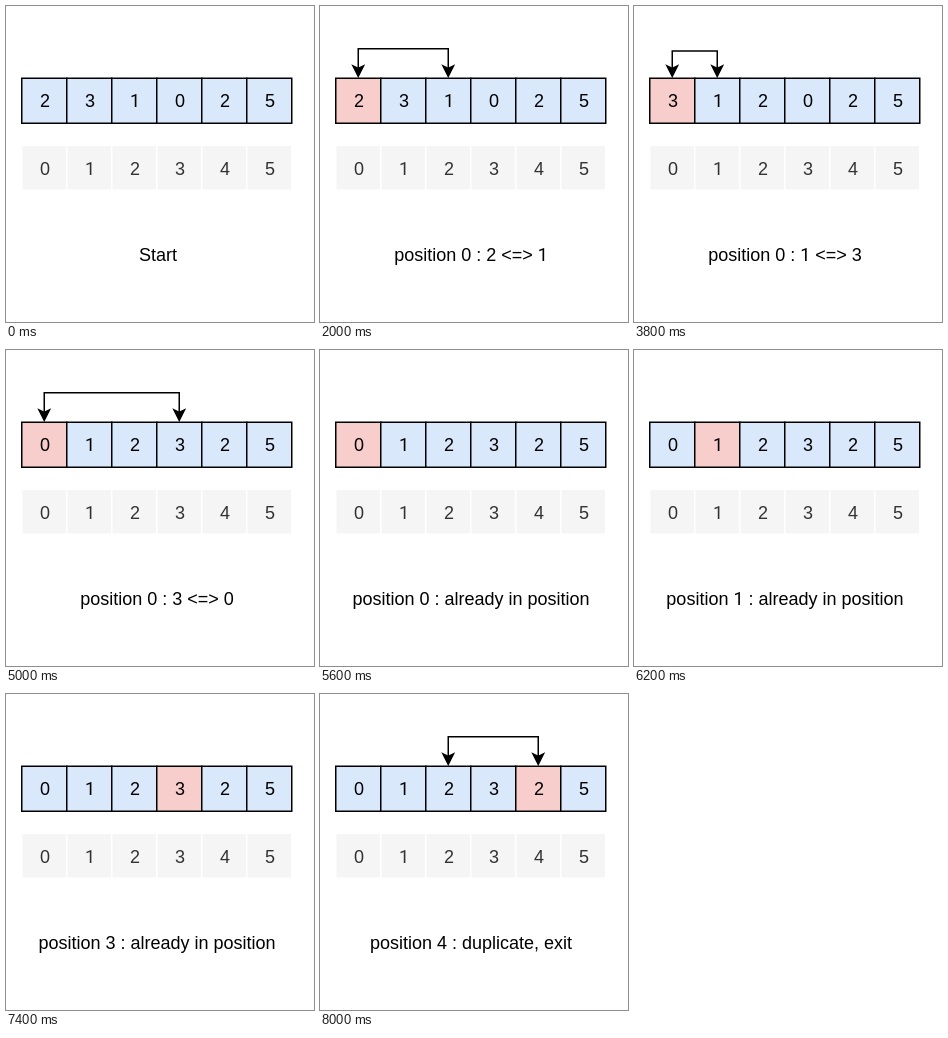
These frames come from a looping animation (308 px wide and 316 px high, 10 s). An HTML page:

```html
<!DOCTYPE html>
<html lang="en">
<head>
<meta charset="utf-8">
<title>In-place duplicate search</title>
<style>
  html, body { margin: 0; width: 100%; height: 100%; overflow: hidden; background: #fff; }
  svg { display: block; width: 308px; height: 316px; }
  text { font: 18px "Liberation Sans", Arial, sans-serif; text-anchor: middle; white-space: pre; }
  .one { font-family: Roboto, sans-serif; }
</style>
</head>
<body>
<svg id="stage" viewBox="0 0 308 316"></svg>
<script>
const NS = "http://www.w3.org/2000/svg";
const stage = document.getElementById("stage");
const LOOP = 10000, LEFT = 15.75, TOP = 72.25, SIZE = 45;
const BLUE = "#dae8fc", RED = "#f8cecc";

// at: start time, cells: values, hot: active cell, to: arrow end
const steps = [
  { at: 0,    cells: "231025", label: "Start" },
  { at: 2000, cells: "231025", hot: 0, to: 2, label: "position 0 : 2 <=> 1" },
  { at: 2600, cells: "132025", hot: 0, to: 2, label: "position 0 : 2 <=> 1" },
  { at: 3200, cells: "132025", hot: 0, to: 1, label: "position 0 : 1 <=> 3" },
  { at: 3800, cells: "312025", hot: 0, to: 1, label: "position 0 : 1 <=> 3" },
  { at: 4400, cells: "312025", hot: 0, to: 3, label: "position 0 : 3 <=> 0" },
  { at: 5000, cells: "012325", hot: 0, to: 3, label: "position 0 : 3 <=> 0" },
  ...[0, 1, 2, 3].map(i => ({
    at: 5600 + i * 600, cells: "012325", hot: i,
    label: `position ${i} : already in position`
  })),
  { at: 8000, cells: "012325", hot: 4, to: 2, label: "position 4 : duplicate, exit" }
];

function add(name, attrs, parent = stage) {
  const el = document.createElementNS(NS, name);
  for (const key in attrs) el.setAttribute(key, attrs[key]);
  parent.appendChild(el);
  return el;
}

// The digit 1 is set in a face that has no foot serif.
function write(el, str) {
  el.textContent = "";
  for (const part of str.split(/(1)/)) {
    if (!part) continue;
    add("tspan", part === "1" ? { class: "one" } : {}, el).textContent = part;
  }
}

function row(y, fill, stroke, ink, baseline) {
  return Array.from({ length: 6 }, (_, i) => ({
    box: add("rect", { x: LEFT + i * SIZE, y, width: SIZE, height: SIZE, fill, stroke, "stroke-width": 1.5 }),
    text: add("text", { x: 39 + i * SIZE, y: baseline, fill: ink })
  }));
}

const cells = row(TOP, BLUE, "#000", "#000", 101);
row(139.25, "#f5f5f5", "#fff", "#333", 169).forEach((c, i) => write(c.text, String(i)));
const label = add("text", { y: 255, fill: "#000" });
const pen = { stroke: "#000", "stroke-width": 1.5, "stroke-miterlimit": 10 };
const wire = add("path", { ...pen, fill: "none" });
const heads = add("path", { ...pen, fill: "#000" });

const middle = i => LEFT + (i + 0.5) * SIZE;
const head = x => `M${x} 70.4l-5.25-10.5 5.25 2.6 5.25-2.6z`;

function show(step) {
  cells.forEach((c, i) => {
    c.box.setAttribute("fill", i === step.hot ? RED : BLUE);
    write(c.text, step.cells[i]);
  });
  label.setAttribute("x", step.hot === undefined ? 152 : 151);
  write(label, step.label);

  let line = "", tips = "";
  if (step.to !== undefined) {
    const a = middle(step.hot), b = middle(step.to);
    const y = step.to === 1 ? 45 : 42.75;
    line = `M${a} 62.5V${y}H${b}V62.5`;
    tips = head(a) + head(b);
  }
  wire.setAttribute("d", line);
  heads.setAttribute("d", tips);
}

let current;
const start = performance.now();
function frame() {
  const t = (performance.now() - start) % LOOP;
  const step = steps.filter(s => s.at <= t).pop();
  if (step !== current) show(current = step);
  requestAnimationFrame(frame);
}
frame();
</script>
</body>
</html>
```
